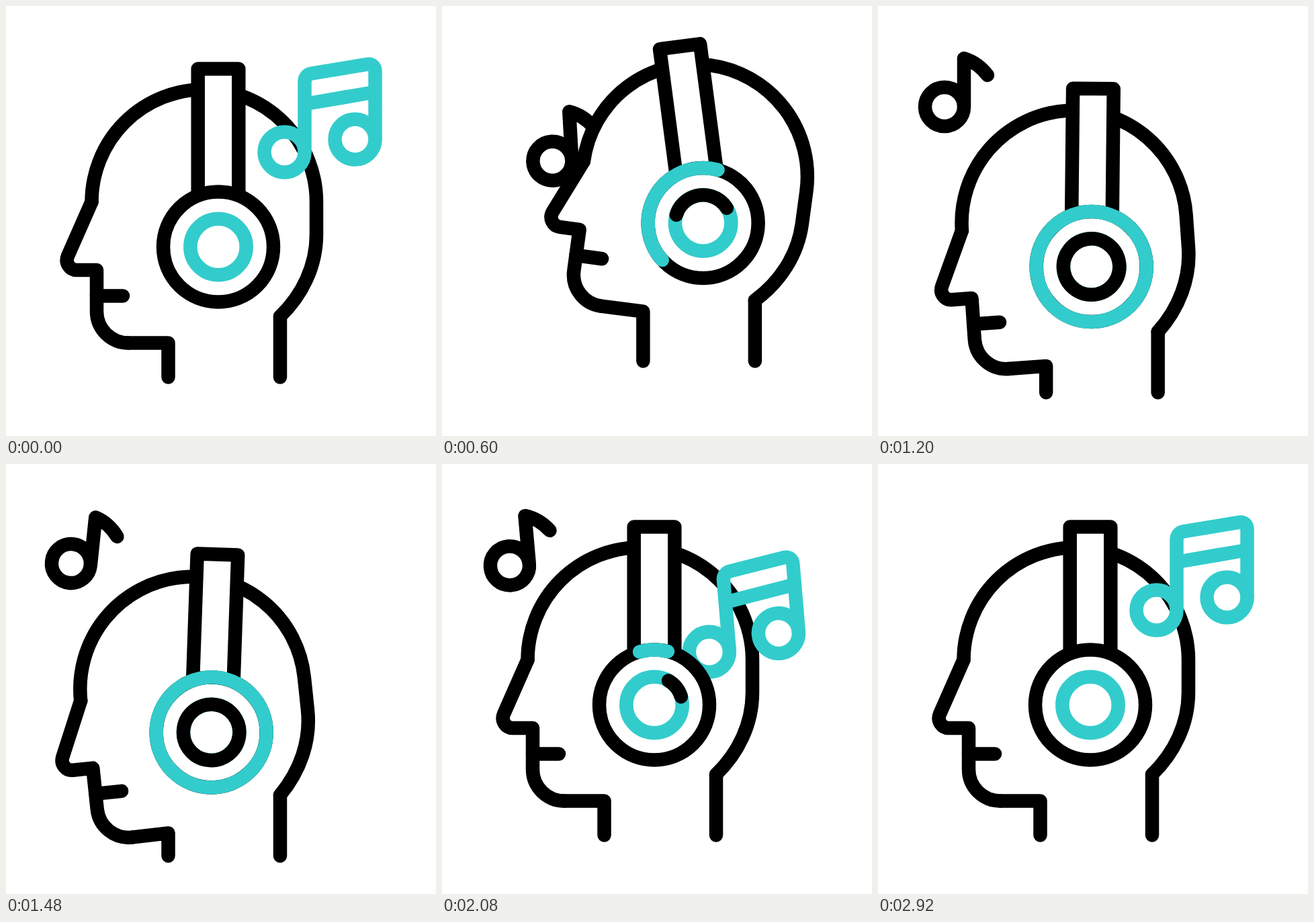
Animation, 640 px wide and 640 px high, one loop 3 s. Source, as an HTML page:

```html
<!DOCTYPE html>
<html lang="en">
<head>
<meta charset="utf-8">
<title>Listening to music</title>
<style>
  html, body { margin: 0; width: 100%; height: 100%; overflow: hidden; background: #fff; }
  svg { display: block; width: 100%; height: 100%; }
  .ink { fill: none; stroke: #000; stroke-width: 20.5; stroke-linecap: round; stroke-linejoin: round; }
  .teal { stroke: #3cc; }
  .solid { fill: #fff; }
</style>
</head>
<body>
<svg viewBox="0 0 640 640">
  <g class="ink">
    <!-- head, drawn around the nape joint -->
    <g id="head">
      <path d="M127.5 291.5A167 167 0 0 1 462 291.5V340C462 387 441 430 408 462"/>
      <path d="M127.5 291.5L92 372C87.500 382.500 95 393 105 393H135V454.500A47 47 0 0 0 182 501.500"/>
      <path d="M135 431.500H174"/>
    </g>
    <path id="throat"/>
    <path id="nape" d="M408 462V552.500"/>

    <path id="small" pathLength="1" d="M163 103C153 90 141 82 128 78V150A29 29 0 1 1 70 150A29 29 0 1 1 128 150"/>

    <g id="big" class="teal">
      <circle cx="414.500" cy="217.500" r="30"/>
      <circle cx="519.500" cy="198.500" r="30"/>
      <path d="M444.500 217.500V113C444.500 106 448.500 101.500 455 100.400L537 86.800C544 85.500 549.500 90 549.500 97V198.500M444.500 146L549.500 128"/>
    </g>

    <g id="cup">
      <path id="band" class="solid" d="M-30.300 -76V-265H30.300V-76"/>
      <circle class="solid" r="82"/>
      <circle class="teal" r="41.700"/>
      <circle id="outer" class="teal" r="82" pathLength="360"/>
      <circle id="inner" r="41.700" pathLength="360"/>
    </g>
  </g>
</svg>
<script>
const LOOP = 3000, STEP = 40;
const $ = id => document.getElementById(id);
const clamp = x => Math.min(1, Math.max(0, x));
const smooth = x => x * x * (3 - 2 * x);
const ramp = (t, start, span) => smooth(clamp((t - start) / span));
const easeOut = (t, start, span) => 1 - (1 - clamp((t - start) / span)) ** 2;

// Eased value through [time, value] keys
function track(t, keys) {
  let v = keys[0][1];
  for (let i = 1; i < keys.length; i++) {
    const [t0, v0] = keys[i - 1], [t1, v1] = keys[i];
    v += (v1 - v0) * ramp(t, t0, t1 - t0);
  }
  return v;
}

// Rest -> leaning back -> nodding forward -> rest
const nod = (t, back, front) => track(t,
  [[200, 0], [680, back], [840, back], [1310, front], [1480, front], [1960, 0]]);

const NAPE = [408, 462];
function pose(t) {
  const x = nod(t, 62.5, 0), y = nod(t, -26, 30.7), turn = nod(t, 8.35, -6);
  const a = turn * Math.PI / 180, c = Math.cos(a), s = Math.sin(a);
  const place = (px, py) => {
    const dx = px - NAPE[0], dy = py - NAPE[1];
    return [NAPE[0] + x + dx * c - dy * s, NAPE[1] + y + dx * s + dy * c];
  };
  return { x, y, turn, place };
}

// Offset on a curve from a note's resting place (s = 0) to the cup (s = 1)
const flight = (s, bend, x, y) => [x * s * s, 2 * bend * s * (1 - s) + y * s * s];

function ring(el, t, turn, lead, grow, shrink) {
  const len = 360 * (ramp(t, ...grow) - ramp(t, ...shrink));
  const start = t < 1400 ? 105.5 + 0.123 * (t - 400) : 252.4 + 0.099 * (t - 1760) - len;
  el.style.display = len > 0.5 ? "" : "none";
  el.setAttribute("stroke-dasharray", len > 359.9 ? "none" : `${len} 400`);
  el.setAttribute("transform", `rotate(${start + lead + turn})`);
}

function drawHead(t) {
  const { x, y, turn, place } = pose(t);
  $("head").setAttribute("transform", `translate(${x} ${y}) rotate(${turn} ${NAPE})`);
  $("nape").setAttribute("transform", `translate(${x} ${y})`);
  const jawY = place(241.5, 501.5)[1];
  $("throat").setAttribute("d", `M${place(182, 501.5)}L${241.5 + x} ${jawY}V${552.5 + y}`);

  $("cup").setAttribute("transform", `translate(${place(316, 358.5)})`);
  $("band").setAttribute("transform", `rotate(${nod(t, -8.1, 2)})`);
  ring($("outer"), t, turn, 0, [315, 648], [1520, 680]);
  ring($("inner"), t, turn, 59, [345, 625], [1570, 650]);
}

// Sinks straight into the cup, later swings back out on a curve
function drawBig(t) {
  const leaving = t < 1200;
  const s = leaving ? ramp(t, 135, 460) : 1 - easeOut(t, 1765, 810);
  const [x, y] = leaving ? [-82 * s, 160 * s] : flight(s, 67, -151, 191);
  const turn = track(t, [[1765, 0], [2320, -8], [2840, 0]]);
  const size = 1 - 0.6 * smooth(clamp((s - 0.62) / 0.38));
  const big = $("big");
  big.style.display = s < 1 ? "" : "none";
  big.setAttribute("transform",
    `translate(${467 + x} ${167 + y}) rotate(${turn}) scale(${size}) translate(-467 -167)`);
}

function drawSmall(t) {
  const [x, y] = flight(1 - easeOut(t, 400, 734), 40, 229, 214);
  const turn = track(t, [[400, 0], [860, -8], [1200, 0], [1480, 6], [1760, 0], [2120, -5.2]]);
  const shown = 1 - ramp(t, 2120, 400);
  const small = $("small");
  small.style.display = t > 400 && shown > 0.005 ? "" : "none";
  small.setAttribute("stroke-dasharray", shown > 0.999 ? "none" : `${shown} 2`);
  small.setAttribute("transform", `translate(${x} ${y}) rotate(${turn} 116 129)`);
}

function frame() {
  const t = Math.floor(performance.now() % LOOP / STEP) * STEP;
  drawHead(t);
  drawBig(t);
  drawSmall(t);
  requestAnimationFrame(frame);
}
frame();
</script>
</body>
</html>
```
